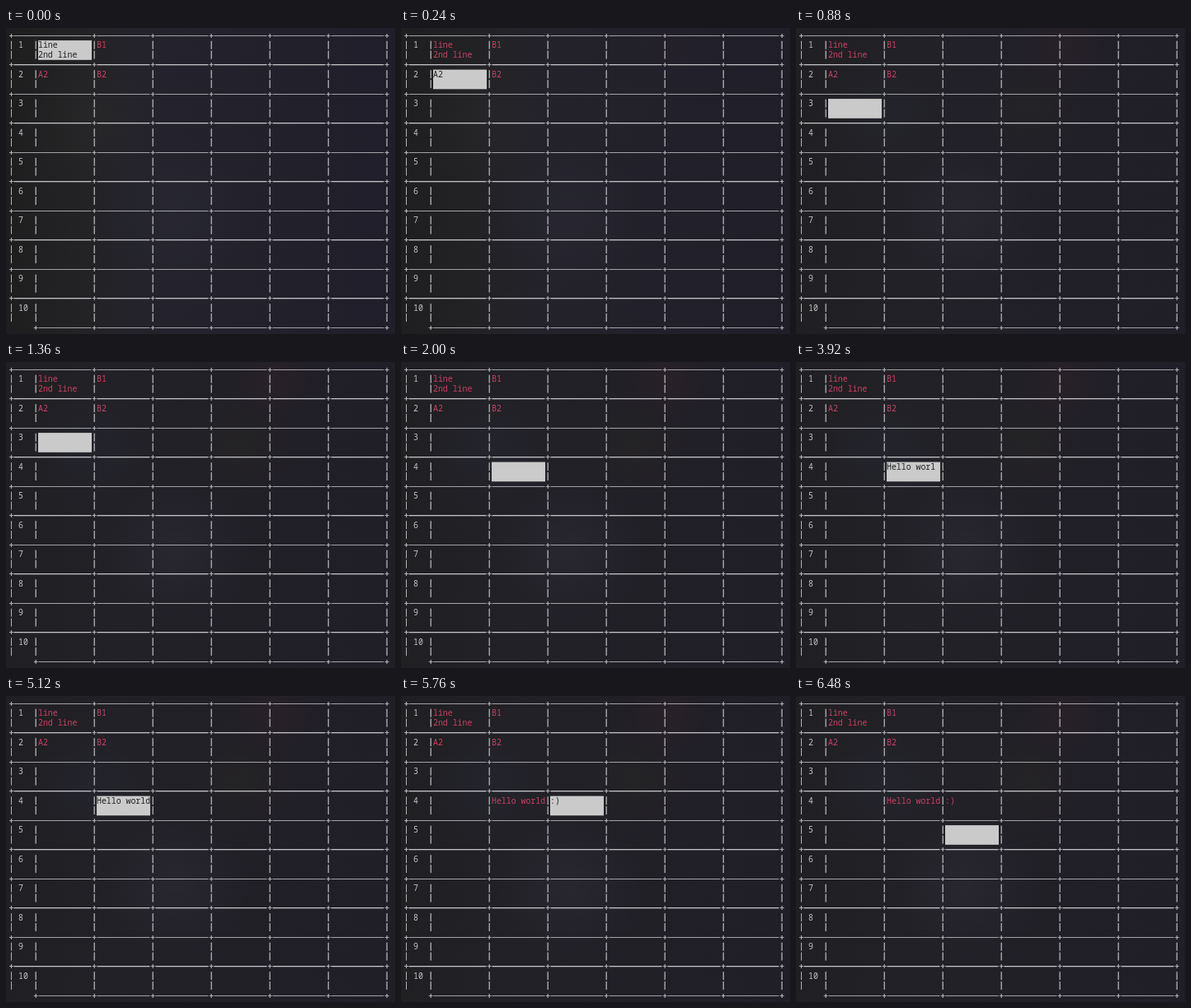
An HTML page with a canvas that plays this animation: 472x372 px, repeating every 6560 ms.

```html
<!DOCTYPE html>
<html lang="en">
<head>
<meta charset="utf-8">
<title>Terminal spreadsheet</title>
<style>
html, body { margin: 0; width: 100%; height: 100%; overflow: hidden; background: #212026; }
canvas { display: block; }
</style>
</head>
<body>
<canvas id="stage" width="472" height="372"></canvas>
<script>
const ctx = document.getElementById('stage').getContext('2d');
const W = 472, H = 372, LOOP = 6560;
const CHAR = 71 / 12, ROW = 35.5, LINE = 11.85, ROWS = 10, COLS = 6;
const INK = '#c4c4c8', RED = '#cb4261', CURSOR = '#cacaca';

const colX = c => 36 + c * 71;
const ruleY = r => Math.floor(9 + r * ROW);

// [time, column, row]
const moves = [[0, 0, 0], [240, 0, 1], [800, 0, 2], [1440, 1, 2], [2000, 1, 3], [5280, 2, 3], [6240, 2, 4]];

// Each cell: column, row, lines, and optional key times for typed text
const cells = [
  { col: 0, row: 0, lines: ['line', '2nd line'] },
  { col: 1, row: 0, lines: ['B1'] },
  { col: 0, row: 1, lines: ['A2'] },
  { col: 1, row: 1, lines: ['B2'] },
  { col: 1, row: 3, lines: ['Hello world'],
    keys: [2560, 2800, 3200, 3360, 3440, 3520, 3600, 3760, 3840, 3920, 4160] },
  { col: 2, row: 3, lines: [':)'], keys: [5600, 5760] }
];

function glow(x, y, radius, rgb, alpha) {
  const g = ctx.createRadialGradient(x, y, 0, x, y, radius);
  g.addColorStop(0, `rgba(${rgb},${alpha})`);
  g.addColorStop(1, `rgba(${rgb},0)`);
  ctx.fillStyle = g;
  ctx.fillRect(0, 0, W, H);
}

function sweep(stops) {
  const g = ctx.createLinearGradient(0, 0, W, 0);
  stops.forEach(([at, color]) => g.addColorStop(at, color));
  ctx.fillStyle = g;
  ctx.fillRect(0, 0, W, H);
}

function drawBackdrop(t) {
  sweep([[0, '#201f22'], [0.3, '#222127'], [1, '#201e26']]);
  glow(100, 105, 70, '38,42,54', 0.4);
  glow(285, 100, 70, '40,39,36', 0.5);
  glow(325, 22, 50, '52,36,42', 0.4);
  glow(205, 230, 90, '46,45,54', 0.5);
  const early = Math.max(0, 1 - t / 1000);
  if (early > 0) {
    ctx.globalAlpha = early;
    sweep([[0, '#1e1e1f'], [0.2, '#232325'], [0.4, '#24232d'], [1, '#201e2a']]);
    glow(105, 115, 80, '42,42,42', 0.5);
    glow(205, 230, 90, '42,42,54', 0.5);
    ctx.globalAlpha = 1;
  }
}

function drawPlus(x, y) {
  ctx.fillRect(x - 2.5, y - 0.5, 5, 1);
  ctx.fillRect(x - 0.6, y - 2.5, 1.2, 5);
}

function drawRule(r) {
  const last = r === ROWS;
  const strong = r % 2 === 1;
  const y = ruleY(r);
  ctx.globalAlpha = strong ? 1 : 0.8;
  for (let c = 0; c < COLS; c++) {
    const from = (c === 0 && !last ? 6 : colX(c)) + 3.5;
    ctx.fillRect(from, y, colX(c + 1) - 3.5 - from, strong ? 1.3 : 1);
  }
  ctx.globalAlpha = 0.85;
  drawPlus(last ? 36.2 : 6.5, y + 0.5);
  for (let c = 1; c <= COLS; c++) drawPlus(colX(c) + 0.2, y + 0.5);
  ctx.globalAlpha = 1;
}

function drawBars(r) {
  ctx.globalAlpha = 0.9;
  for (let n = 0; n < 2; n++) {
    const y = 15.7 + r * ROW + n * LINE;
    ctx.fillRect(6, y, 1, 10);
    for (let c = 0; c <= COLS; c++) ctx.fillRect(colX(c) - 0.45, y, 1.3, 10);
  }
  ctx.globalAlpha = 1;
}

function drawText(text, x, row, line = 0) {
  ctx.fillText(text, x, 24.3 + row * ROW + line * LINE);
}

function drawGrid() {
  ctx.fillStyle = INK;
  for (let r = 0; r <= ROWS; r++) drawRule(r);
  for (let r = 0; r < ROWS; r++) {
    drawBars(r);
    drawText(String(r + 1), 15, r);
  }
}

function draw(t) {
  const [, col, row] = moves.filter(m => m[0] <= t).pop();
  drawBackdrop(t);
  ctx.font = `500 ${CHAR / 0.6}px "Noto Sans Mono", "DejaVu Sans Mono", monospace`;
  drawGrid();

  ctx.fillStyle = CURSOR;
  ctx.fillRect(colX(col) + 3, 15.1 + row * ROW, 65, 2 * LINE);

  for (const cell of cells) {
    const active = cell.col === col && cell.row === row;
    const shown = cell.keys ? cell.keys.filter(k => k <= t).length : Infinity;
    ctx.fillStyle = active ? '#202022' : RED;
    cell.lines.forEach((s, i) => drawText(s.slice(0, shown), colX(cell.col) + 3, cell.row, i));
  }
}

const start = performance.now();
function tick() {
  draw((performance.now() - start) % LOOP);
  requestAnimationFrame(tick);
}
tick();
</script>
</body>
</html>
```
